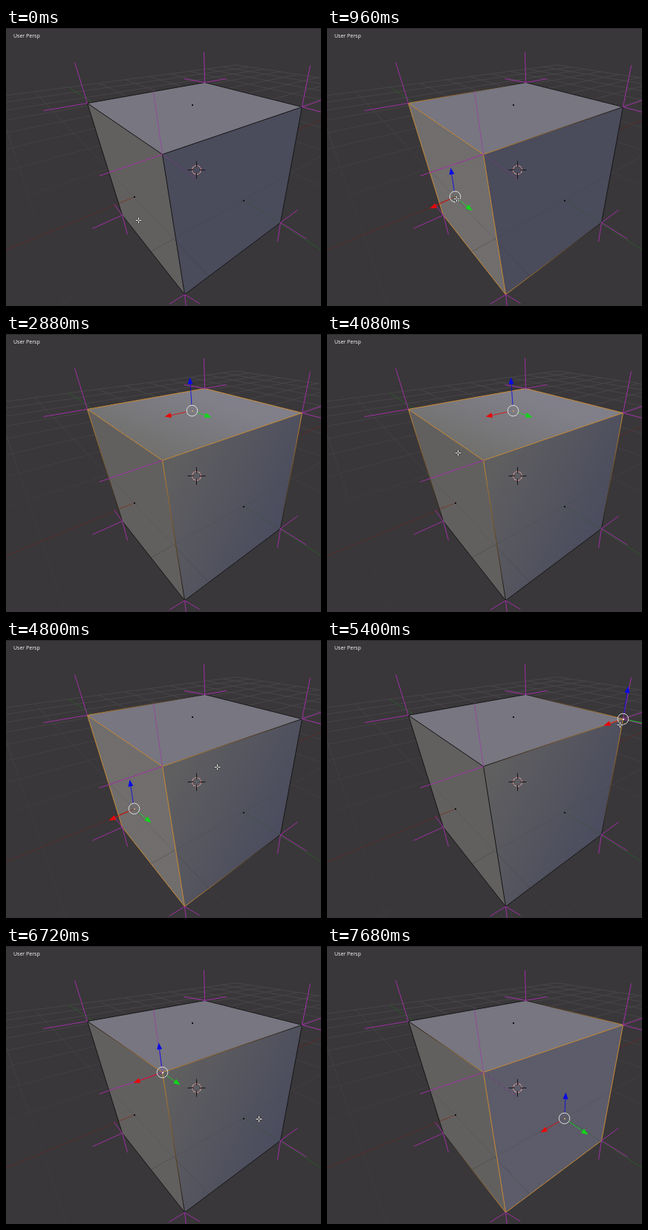
Write an HTML page with a canvas that moves like this. It is 424 px wide and 375 px high and loops after 7.8 s.

```html
<!DOCTYPE html>
<html lang="en">
<head>
<meta charset="utf-8">
<style>
  html, body { margin: 0; width: 100%; height: 100%; overflow: hidden; background: #393739; }
  canvas { display: block; }
  div { position: absolute; left: 10px; top: 6px; font: 7px/10px "Open Sans", "Noto Sans", sans-serif; color: #fff; white-space: nowrap; }
</style>
</head>
<body>
<canvas id="view" width="424" height="375"></canvas>
<div>User Persp</div>
<script>
const ctx = document.getElementById('view').getContext('2d');
const LOOP = 7800, STEP = 120, ORANGE = '#c98a35';

function gradient(from, to, startColor, endColor) {
  const g = ctx.createLinearGradient(...from, ...to);
  g.addColorStop(0, startColor);
  g.addColorStop(1, endColor);
  return g;
}

// Cube corners: top ring A B C D, bottom ring E F G
const corner = {
  A: [109, 101], B: [267, 73], C: [398, 106], D: [210, 170],
  E: [240, 359], F: [369, 262], G: [156, 252]
};
const edges = ['AB', 'BC', 'CD', 'DA', 'DE', 'CF', 'AG', 'EF', 'EG'];
// A face takes its shade instead of its fill during the given time span
const faces = {
  ABCD: {
    fill: '#777681', dot: [250, 103], shadeTime: [2760, 4440],
    shade: gradient([250, 80], [215, 170], '#757580', '#62635f')
  },
  ADEG: { fill: '#62605f', dot: [172, 227], shadeTime: [0, 0] },
  DCFE: {
    fill: '#4a4b5b', dot: [319, 232], shadeTime: [2160, 7320],
    shade: gradient([215, 195], [365, 265], '#5f5f60', '#4b4c5e')
  }
};
const normals = {
  A: [[92, 46], [50, 111]],
  B: [[266, 32], [296, 68], [239, 68]],
  C: [[409, 50], [424, 97], [424, 113]],
  D: [[125, 199]],
  E: [[219, 372], [242, 376], [260, 371]],
  F: [[392, 245], [365, 288], [404, 284]],
  G: [[116, 270], [163, 278], [145, 237]]
};

// Arrow tips of the manipulator: blue, red, green
const gizmos = {
  ABCD: [[247, 58], [213, 111], [276, 112]],
  ADEG: [[166, 188], [138, 243], [195, 246]],
  DCFE: [[321, 197], [287, 251], [351, 254]],
  C: [[405, 62], [372, 115], [446, 116]],
  D: [[205, 130], [171, 184], [234, 187]]
};
const arrowColors = ['#0808e8', '#e80808', '#10d818'];

const selections = [
  [0, ''], [600, 'ADEG'], [1440, 'D'], [2160, 'DCFE'], [2760, 'ABCD'],
  [4440, 'ADEG'], [5160, 'C'], [6240, 'D'], [7320, 'DCFE']
];
// Pointer: time, x, y
const pointerPath = [
  [0, 178, 259], [480, 174, 230], [960, 174, 230], [1320, 212, 172],
  [1960, 212, 172], [2100, 318, 234], [2400, 318, 234], [2640, 250, 105],
  [3600, 250, 105], [4080, 176, 160], [4320, 173, 227], [4560, 173, 227],
  [5040, 394, 114], [5520, 394, 114], [6120, 212, 172], [6400, 212, 172],
  [6720, 340, 233], [7080, 321, 234], [LOOP, 321, 234]
];
const pointerHidden = [[600, 960], [1440, 2040], [2160, 2400], [2760, 3600], [7320, LOOP]];
const within = (t, [from, to]) => t >= from && t < to;

function line(a, b, color, width = 1) {
  ctx.strokeStyle = color;
  ctx.lineWidth = width;
  ctx.beginPath();
  ctx.moveTo(...a);
  ctx.lineTo(...b);
  ctx.stroke();
}

function polygon(points) {
  ctx.beginPath();
  points.forEach(p => ctx.lineTo(...p));
  ctx.closePath();
}

function circle([x, y], r) {
  ctx.beginPath();
  ctx.arc(x, y, r, 0, 2 * Math.PI);
}

function dot([x, y], color) {
  ctx.fillStyle = color;
  ctx.fillRect(x - .5, y - .5, 2, 2);
}

const facePoints = name => [...name].map(c => corner[c]);

// Floor coordinates to screen, with one vanishing point per axis
const depth = (u, v) => 1 + .1513 * u + .1651 * v;
function floor(u, v) {
  const a = .1513 * u, b = .1651 * v, w = depth(u, v);
  return [(258.4 + 743 * a - 48 * b) / w, (192 - 8 * a - 6 * b) / w];
}

function floorLine(point, color) {
  let start = -8;
  while (depth(...point(start)) < .12) start += .1;
  if (start < 8) line(floor(...point(start)), floor(...point(8)), color);
}

// Grid lines fade toward the viewer
const gridColor = gradient([0, 50], [0, 240], '#484648', '#3c3a3c');
function drawFloor() {
  for (let k = -8; k <= 8; k++) {
    if (!k) continue;
    floorLine(s => [s, k], gridColor);
    floorLine(s => [k, s], gridColor);
  }
  floorLine(s => [s, 0], '#572a2b');
  floorLine(s => [0, s], '#2b592d');
}

function makeStipple() {
  const tile = document.createElement('canvas');
  tile.width = tile.height = 2;
  const c = tile.getContext('2d');
  c.fillStyle = 'rgba(190,180,185,.32)';
  c.fillRect(0, 0, 1, 1);
  c.fillRect(1, 1, 1, 1);
  const pattern = ctx.createPattern(tile, 'repeat');
  pattern.setTransform(new DOMMatrix().translate(.5, .5));
  return pattern;
}
const stipple = makeStipple();

function drawCube(selected, t) {
  for (const [name, face] of Object.entries(faces)) {
    polygon(facePoints(name));
    ctx.fillStyle = within(t, face.shadeTime) ? face.shade : face.fill;
    ctx.fill();
    if (name === selected) {
      ctx.fillStyle = stipple;
      ctx.fill();
    }
  }

  // The floor in front of the cube covers its lower half
  ctx.save();
  polygon([floor(-1, 1), floor(-1, -1), floor(1, -1), corner.F, corner.E, corner.G]);
  ctx.clip();
  ctx.globalAlpha = .4;
  drawFloor();
  ctx.restore();

  const edgeColor = c => selected.includes(c) ? ORANGE : '#151515';
  for (const [from, to] of edges) {
    const a = corner[from], b = corner[to];
    line(a, b, gradient(a, b, edgeColor(from), edgeColor(to)));
  }
  for (const face of Object.values(faces)) dot(face.dot, '#111');
  if (selected !== 'ABCD') line(corner.D, [198, 85], '#9a409f', .8);
  if (t < 2760 || t >= 7320) line(corner.D, [256, 203], '#75407f', .8);
  line([152, 235], [171, 228], '#79452e', .8);
}

function drawNormals() {
  for (const name in normals)
    for (const tip of normals[name]) line(corner[name], tip, '#a02fa6');
}

function drawOriginMarker() {
  const c = [256, 191];
  circle(c, 6);
  ctx.lineWidth = 1;
  ctx.strokeStyle = '#d8d0d0';
  ctx.stroke();
  ctx.setLineDash([2.4, 2.3]);
  ctx.strokeStyle = '#a43c3c';
  ctx.stroke();
  ctx.setLineDash([]);
  for (const [dx, dy] of [[1, 0], [-1, 0], [0, 1], [0, -1]])
    line([c[0] + 4 * dx, c[1] + 4 * dy], [c[0] + 12 * dx, c[1] + 12 * dy], '#151515');
}

function drawArrow([x, y], tip, color) {
  const length = Math.hypot(tip[0] - x, tip[1] - y);
  ctx.save();
  ctx.translate(x, y);
  ctx.rotate(Math.atan2(tip[1] - y, tip[0] - x));
  line([8, 0], [length - 8, 0], color, .8);
  polygon([[length, 0], [length - 9, -3.5], [length - 9, 3.5]]);
  ctx.fillStyle = color;
  ctx.fill();
  ctx.restore();
}

function drawGizmo(selected) {
  if (!selected) return;
  const face = faces[selected];
  const center = face ? face.dot : corner[selected];
  gizmos[selected].forEach((tip, i) => drawArrow(center, tip, arrowColors[i]));
  circle(center, 7.3);
  ctx.strokeStyle = '#dcdcdc';
  ctx.lineWidth = 1;
  ctx.stroke();
  dot(center, face ? '#b99a72' : '#e8e0d8');
}

function drawPointer(t) {
  if (pointerHidden.some(span => within(t, span))) return;
  const i = pointerPath.findIndex(p => p[0] > t);
  const [t0, x0, y0] = pointerPath[i - 1], [t1, x1, y1] = pointerPath[i];
  const k = (t - t0) / (t1 - t0);
  const x = Math.round(x0 + (x1 - x0) * k);
  const y = Math.round(y0 + (y1 - y0) * k);
  for (const [color, width, reach] of [['#222', 3, 4.5], ['#fff', 1.4, 4]]) {
    for (const [dx, dy] of [[1, 0], [-1, 0], [0, 1], [0, -1]])
      line([x + dx, y + dy], [x + dx * reach, y + dy * reach], color, width);
  }
}

function draw(now) {
  const t = Math.floor(now % LOOP / STEP) * STEP;
  const selected = selections.filter(s => s[0] <= t).pop()[1];
  ctx.fillStyle = '#393739';
  ctx.fillRect(0, 0, 424, 375);
  ctx.fillStyle = '#2b2a2b';
  ctx.fillRect(0, 0, 424, 1);
  ctx.save();
  ctx.translate(.5, .5);
  drawFloor();
  drawCube(selected, t);
  drawNormals();
  drawOriginMarker();
  drawGizmo(selected);
  drawPointer(t);
  ctx.restore();
}

const start = performance.now();
function frame() {
  draw(performance.now() - start);
  requestAnimationFrame(frame);
}
frame();
</script>
</body>
</html>
```
